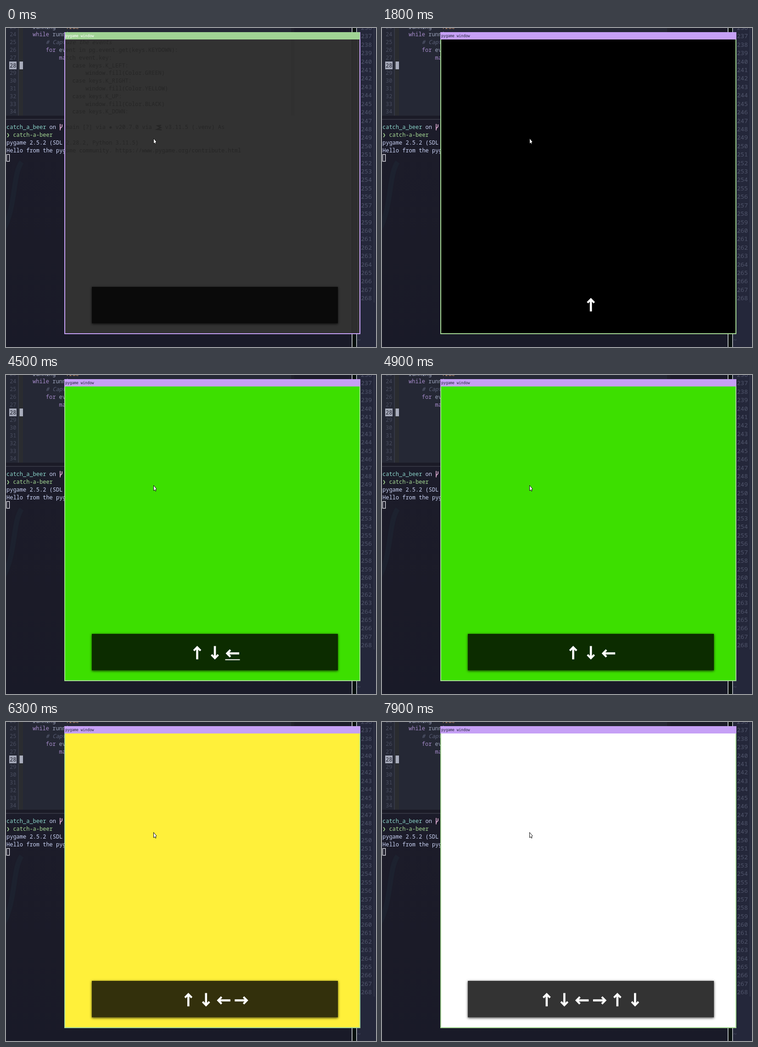
Animation of 806 by 695 pixels, one loop 8000 ms. Source, as an HTML page with a canvas:

```html
<!DOCTYPE html>
<html lang="en">
<head>
<meta charset="utf-8">
<style>
  html, body { margin: 0; width: 100%; height: 100%; overflow: hidden; background: #1c1c29; }
  canvas { display: block; }
</style>
</head>
<body>
<canvas id="stage" width="806" height="695"></canvas>
<script>
const ctx = document.getElementById('stage').getContext('2d');
const LOOP = 8000;
const MONO = '"Noto Sans Mono", "DejaVu Sans Mono", monospace';
const CELL = 7.2, ROW = 16.8;
const MAUVE = '#c6a0f6', GREEN = '#a6da95', GHOST = '#262626';

// Each state starts at `at`; the newest arrow is underlined until `mark`.
const STATES = [
  { at: 0, fill: '#323232', keys: '' },
  { at: 300, fill: '#333333', keys: '' },
  { at: 1600, fill: '#000000', keys: 'U', mark: 1800 },
  { at: 3200, fill: '#ffffff', keys: 'UD' },
  { at: 4500, fill: '#3ddf00', keys: 'UDL', mark: 4900 },
  { at: 5800, fill: '#fff03a', keys: 'UDLR', mark: 6300 },
  { at: 6700, fill: '#000000', keys: 'UDLRU', mark: 6900 },
  { at: 7600, fill: '#ffffff', keys: 'UDLRUD', mark: 7900 },
];
const TURN = { U: 0, R: Math.PI / 2, D: Math.PI, L: -Math.PI / 2 };

const KEYWORD = '#a58bc9', CODE = '#9ba2ba', COMMENT = '#5b6078', TEXT = '#cad3f5';
// [row, column, text, colour] on the editor grid, rows counted from line 23.
const EDITOR = [
  [0, 0, 'running = ', CODE], [0, 10, 'True', '#c9946f'],
  [1, 0, 'while', KEYWORD], [1, 6, 'running:', CODE],
  [2, 4, '# Capture the events', COMMENT],
  [3, 4, 'for', KEYWORD], [3, 8, 'event in pg.event.get(keys.KEYDOWN):', CODE],
  [4, 8, 'match', KEYWORD], [4, 14, 'event.key:', CODE],
  ...['LEFT', 'GREEN', 'RIGHT', 'YELLOW', 'UP', 'BLACK', 'DOWN'].map((word, i) => i % 2
    ? [5 + i, 16, `window.fill(Color.${word})`, CODE]
    : [5 + i, 12, `case keys.K_${word}:`, CODE]),
];
const SHELL = [
  [0, 0, 'catch_a_beer', '#8bd5ca'], [0, 13, 'on', TEXT],
  [0, 18, 'main [?] via ● v20.7.0 via', '#f5bde6'], [0, 48, 'v3.11.5 (.venv) As', '#eed49f'],
  [1, 0, '❯', GREEN], [1, 2, 'catch-a-beer', GREEN],
  [2, 0, 'pygame 2.5.2 (SDL 2.28.2, Python 3.11.5)', TEXT],
  [3, 0, 'Hello from the pygame community. https://www.pygame.org/contribute.html', TEXT],
];

function rect(x, y, w, h, color) {
  ctx.fillStyle = color;
  ctx.fillRect(x, y, w, h);
}

function label(text, x, y, color, size = 12, style = '') {
  ctx.font = `${style} ${size}px ${MONO}`;
  ctx.fillStyle = color;
  ctx.fillText(text, x, y);
}

function line(points, color, width) {
  ctx.strokeStyle = color;
  ctx.lineWidth = width;
  ctx.beginPath();
  points.forEach(([x, y]) => ctx.lineTo(x, y));
  ctx.stroke();
}

function drawGrid(entries, left, baseline, tint) {
  for (const [row, col, text, color] of entries) {
    label(text, left + col * CELL, baseline + row * ROW, tint || color, 12,
      color === COMMENT ? 'italic' : '');
  }
}

function drawTexts(tint) {
  drawGrid(EDITOR, 58, 1.5, tint);
  drawGrid(SHELL, 1, 220.3, tint);
}

function drawWallpaper() {
  const shade = ctx.createLinearGradient(0, 190, 0, 695);
  shade.addColorStop(0, '#1c1c2a');
  shade.addColorStop(0.6, '#1b1b28');
  shade.addColorStop(1, '#191a28');
  rect(0, 0, 806, 695, shade);
  ctx.strokeStyle = 'rgba(30,48,62,.3)';
  ctx.lineWidth = 11;
  ctx.beginPath();
  ctx.moveTo(34, 292);
  ctx.bezierCurveTo(14, 320, 22, 390, -6, 440);
  ctx.stroke();
}

function drawEditor() {
  rect(0, 0, 622, 191, '#252835');
  rect(621, 0, 7, 191, '#20212c');
  rect(0, 191, 754, 8, '#1b1b27');
  rect(0, 198.5, 754, 1, '#4b4d58');
  rect(26, 0, 2, 191, '#343745');
  rect(28, 0, 9, 191, '#2a2c30');
  rect(7, 73, 16, 17, '#a4a8b8');
  rect(29.5, 73, 7.5, 17, '#a9adbc');
  for (let n = 23; n <= 34; n++) {
    label(n, 8, 1.5 + (n - 23) * ROW, n === 28 ? '#20222e' : '#494d5f');
  }
}

function drawRightPane() {
  rect(764, 0, 42, 695, '#24273a');
  rect(753, 0, 11, 695, '#07100f');
  rect(753, 0, 1.5, 695, '#dfe3e6');
  rect(763, 0, 1.3, 695, '#dfe3e6');
  rect(801, 0, 1.5, 598, '#363a4d');
  for (let n = 236; n <= 268; n++) {
    label(n, 773, 22.3 + (n - 237) * 18.42, '#50556b', 13.4);
  }
  label('~', 765, 685, '#454a60', 13.4);
}

function drawBackdrop() {
  drawWallpaper();
  drawEditor();
  drawRightPane();
  drawTexts();
  line([[118, 209], [118, 223]], '#f5bde6', 1.5);
  line([[118, 219], [122, 215], [122, 210]], '#f5bde6', 1.5);
  ctx.strokeStyle = '#e8e8ee';
  ctx.lineWidth = 1.3;
  ctx.strokeRect(1.5, 275.5, 6, 15);
}

function drawGhost() {
  ctx.save();
  ctx.beginPath();
  ctx.rect(129, 25, 641, 640);
  ctx.clip();
  rect(621, 25, 7, 166, '#303030');
  rect(754, 25, 9, 640, '#2e2e2e');
  rect(753, 25, 1, 640, '#272727');
  rect(763, 25, 1, 640, '#272727');
  drawTexts(GHOST);
  line([[338, 212], [330, 213], [337, 217], [329, 221], [339, 222]], GHOST, 2.5);
  ctx.restore();
}

function drawWindow(fill, focused) {
  rect(127, 9, 645, 658, focused ? GREEN : MAUVE);
  rect(focused ? 127 : 129, 9, focused ? 645 : 642, 16, focused ? MAUVE : '#a0d394');
  rect(129, 25, 641, 640, fill);
  ctx.font = '8px "DejaVu Sans Mono", monospace';
  ctx.fillStyle = focused ? '#24273a' : '#ffffff';
  ctx.fillText('pygame window', 129, 20);
  if (!focused) drawGhost();
}

function drawPointer() {
  ctx.beginPath();
  [[321.5, 240.5], [321.5, 252], [324, 250], [325.6, 253.2], [327, 252.4],
    [325.8, 249.3], [328, 248.2]].forEach(([x, y]) => ctx.lineTo(x, y));
  ctx.closePath();
  ctx.fillStyle = '#fff';
  ctx.fill();
  ctx.strokeStyle = '#111';
  ctx.lineWidth = 1;
  ctx.stroke();
}

function drawArrow(x, y, key) {
  ctx.save();
  ctx.translate(x, y);
  ctx.rotate(TURN[key]);
  line([[-7.4, -4.6], [0, -12], [7.4, -4.6]], '#fff', 4.2);
  line([[0, -12], [0, 14.5]], '#fff', 4.6);
  ctx.restore();
}

function drawKeys({ fill, keys, mark = 0 }, time) {
  ctx.save();
  ctx.shadowColor = 'rgba(0,0,0,.75)';
  ctx.shadowBlur = 5;
  ctx.shadowOffsetY = 1;
  rect(187, 564, 536, 79.5, fill);
  ctx.restore();
  rect(187, 564, 536, 79.5, 'rgba(0,0,0,.8)');

  const lift = keys.length === 1 ? 2 : 0;
  const first = 455 - (keys.length - 1) * 19.25;
  [...keys].forEach((key, i) => {
    const sideways = key === 'L' || key === 'R';
    drawArrow(first + i * 38.5, (sideways ? 606.5 : 605) - lift, key);
  });
  if (time < mark) {
    rect(first + (keys.length - 1) * 38.5 - 16, 619.3 - lift, 32, 2, '#fff');
  }
}

function frame(now) {
  const time = now % LOOP;
  const state = STATES.findLast(s => s.at <= time);
  drawBackdrop();
  drawWindow(state.fill, time >= 300);
  drawPointer();
  drawKeys(state, time);
  requestAnimationFrame(frame);
}

requestAnimationFrame(() => frame(performance.now()));
</script>
</body>
</html>
```
